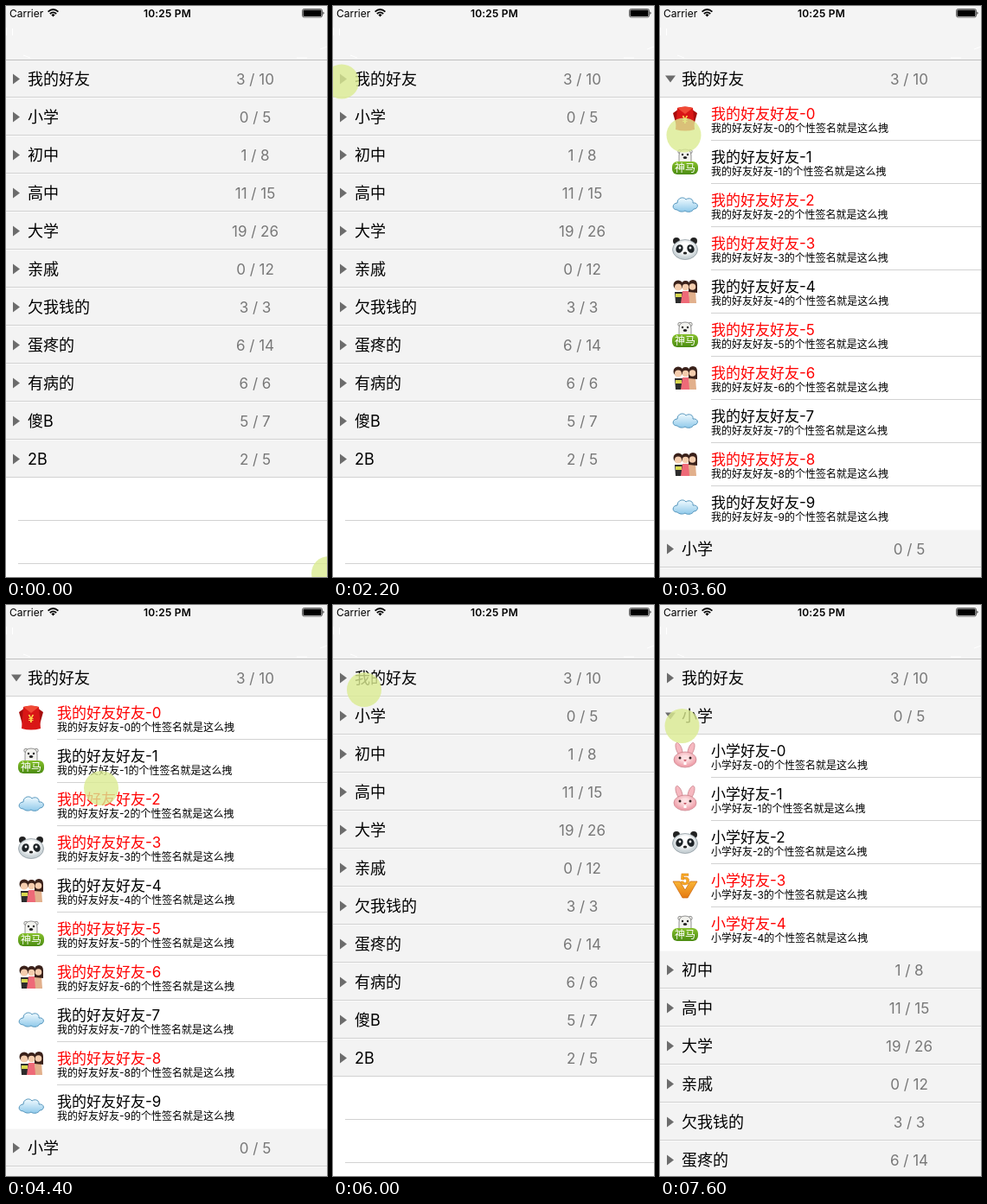
Animation of 371x661 px, one loop 8000 ms. Source, as an HTML page:

```html
<!DOCTYPE html>
<html lang="zh">
<head>
<meta charset="utf-8">
<title>Friend list</title>
<style>
html, body { margin: 0; width: 100%; height: 100%; overflow: hidden; background: #fff; }
svg { display: block; width: 371px; height: 661px; font-family: Inter, "Noto Sans CJK SC", "Noto Sans CJK", sans-serif; }
.group { font-size: 18px; }
.count { font-size: 17px; fill: #777; text-anchor: middle; }
.name { font-size: 17px; }
.vip { fill: #f00; }
.note { font-size: 12px; }
.line { fill: #d2d2d2; }
</style>
</head>
<body>
<svg viewBox="0 0 371 661">
  <defs>
    <linearGradient id="sky" x2="0" y2="1"><stop stop-color="#f2fbff"/><stop offset="1" stop-color="#8fc9ea"/></linearGradient>
    <linearGradient id="gold" x2="0" y2="1"><stop stop-color="#f9b536"/><stop offset="1" stop-color="#e57a12"/></linearGradient>
    <linearGradient id="grass" x2="0" y2="1"><stop stop-color="#86c02c"/><stop offset="1" stop-color="#4b8c12"/></linearGradient>
    <radialGradient id="face" cy=".4"><stop offset=".5" stop-color="#fff"/><stop offset="1" stop-color="#c9d2d6"/></radialGradient>
    <radialGradient id="pink" cy=".4"><stop offset=".3" stop-color="#fde0e2"/><stop offset="1" stop-color="#efa3ad"/></radialGradient>

    <g id="packet">
      <path d="M1 8L8 3 11 25 6 26ZM29 8L22 3 19 25 24 26Z" fill="#a80d0d"/>
      <path d="M6 2Q15-1 24 2L26 27Q15 30 4 27Z" fill="#d91616"/>
      <path d="M6 2L15 9 24 2Q15-1 6 2Z" fill="#f04a35"/>
      <text x="15" y="20" font-size="12" font-weight="700" text-anchor="middle" fill="#ffd34d">¥</text>
    </g>
    <g id="bear">
      <g fill="#f2f2ee" stroke="#777" stroke-width=".8">
        <circle cx="9" cy="2.5" r="2.2"/><circle cx="21" cy="2.5" r="2.2"/>
        <path d="M8 18V7Q8 0 15 0T22 7V18Z"/>
      </g>
      <g fill="#222"><circle cx="12" cy="6" r="1.2"/><circle cx="18" cy="6" r="1.2"/><ellipse cx="15" cy="9.5" rx="2.2" ry="1.6"/></g>
      <rect y="14" width="30" height="15" rx="6" fill="url(#grass)"/>
      <text x="15" y="26" font-size="12" text-anchor="middle" fill="#fff">神马</text>
    </g>
    <path id="cloud" d="M6 20C-1 20 0 12 6 12C6 6 13 4 16 8C20 5 25 8 24 12C31 11 31 19 25 19C23 23 17 23 15 21C12 23 8 22 6 20Z" fill="url(#sky)" stroke="#5596bd" stroke-width="1"/>
    <g id="panda">
      <circle cx="5" cy="6" r="4" fill="#222"/><circle cx="25" cy="6" r="4" fill="#222"/>
      <ellipse cx="15" cy="16" rx="14.5" ry="11.5" fill="url(#face)" stroke="#87939a" stroke-width=".7"/>
      <ellipse cx="8.5" cy="15" rx="4" ry="5" fill="#1c2226" transform="rotate(25 8.5 15)"/>
      <ellipse cx="21.5" cy="15" rx="4" ry="5" fill="#1c2226" transform="rotate(-25 21.5 15)"/>
      <circle cx="9" cy="14" r="1.4" fill="#fff"/><circle cx="21" cy="14" r="1.4" fill="#fff"/>
      <ellipse cx="15" cy="20" rx="2.2" ry="1.5" fill="#222"/>
    </g>
    <g id="kids">
      <path d="M4 28L3 15H12V28Z" fill="#2c2c2c"/><path d="M10 28L12 14H19L21 28Z" fill="#ee6a78"/><path d="M20 28L19 14H27L28 28Z" fill="#e2b08c"/>
      <g fill="#3a211a"><circle cx="7" cy="7" r="5.5"/><circle cx="15.5" cy="7" r="5"/><path d="M19 15V7Q19 1 24 1T29 7V16Z"/></g>
      <g fill="#f5cdae"><circle cx="7" cy="9.5" r="4"/><circle cx="15.5" cy="9.5" r="3.8"/><circle cx="23.5" cy="9" r="3.8"/></g>
      <path d="M4 17H11V21H4Z" fill="#d8d84e"/>
    </g>
    <g id="rabbit">
      <g fill="#f6b8c0" stroke="#c77f88" stroke-width=".7">
        <ellipse cx="8" cy="7" rx="3.2" ry="8" transform="rotate(-20 8 7)"/>
        <ellipse cx="22" cy="7" rx="3.2" ry="8" transform="rotate(20 22 7)"/>
        <ellipse cx="15" cy="19" rx="13" ry="9" fill="url(#pink)"/>
      </g>
      <circle cx="9" cy="17" r="1.5" fill="#322"/><circle cx="21" cy="17" r="1.5" fill="#322"/>
      <path d="M13 19H17L15 21Z" fill="#c44e5c"/><path d="M13.5 22H16.5V25H13.5Z" fill="#fff"/>
    </g>
    <g id="five">
      <path d="M1 10H9L15 20 21 10H29L18 29H12Z" fill="url(#gold)" stroke="#c8640c" stroke-width=".7"/>
      <text x="15" y="14" font-size="17" font-weight="800" text-anchor="middle" fill="#f7a823" stroke="#d77b12" stroke-width=".5">5</text>
    </g>
  </defs>

  <g id="table"></g>

  <rect width="371" height="62" fill="#f4f4f4"/>
  <rect y="62" width="371" height="1" fill="#bfbfbf"/>
  <path d="M.5 25V34M7.5 26V34M20 57L28 60M336 60H348M363 50L371 47" stroke="#fff" fill="none"/>
  <text x="4" y="13" font-size="12">Carrier</text>
  <g fill="none" stroke="#000" stroke-width="1.7">
    <path d="M48.6 6.7Q54.5 1.3 60.4 6.7M50.8 9Q54.5 5.7 58.2 9"/>
    <path d="M52.4 10.2Q54.5 8.4 56.6 10.2L54.5 12.5Z" fill="#000" stroke="none"/>
  </g>
  <text x="186.5" y="13" font-size="12" font-weight="600" letter-spacing=".2" text-anchor="middle">10:25 PM</text>
  <rect x="342.5" y="3.5" width="23" height="9.5" rx="2" fill="none" stroke="#000" stroke-width=".6"/>
  <rect x="343.5" y="4.5" width="21" height="7.5" rx="1"/>
  <path d="M366.5 6.5Q368.5 8.2 366.5 10Z"/>

  <circle id="touch" r="20" fill="#dbeb92" fill-opacity=".8"/>
</svg>
<script>
const TOP = 62, HEAD = 44, ROW = 50, LOOP = 8000, STEP = 200;
const groups = [
  ['我的好友', '3 / 10'], ['小学', '0 / 5'], ['初中', '1 / 8'], ['高中', '11 / 15'],
  ['大学', '19 / 26'], ['亲戚', '0 / 12'], ['欠我钱的', '3 / 3'], ['蛋疼的', '6 / 14'],
  ['有病的', '6 / 6'], ['傻B', '5 / 7'], ['2B', '2 / 5']
];
// Icons per group; * marks a red name
const friends = [
  '*packet bear *cloud *panda kids *bear *kids cloud *kids cloud',
  'rabbit rabbit panda *five *bear'
].map(s => s.split(' '));
// Touch path: time, x, y
const path = [
  [0, 373, 657], [800, 373, 657], [1000, 293, 600], [1200, 304, 589.5], [1400, 304, 589.5],
  [1800, 130, 210], [2000, 24, 19], [2200, 10, 87.5], [2600, 13, 86], [3200, 13, 86],
  [3400, 22, 122], [3600, 27.5, 149.5], [3800, 27, 132], [4000, 38, 148], [4400, 110, 212],
  [4600, 135, 224], [4800, 128, 206], [5000, 106, 186], [5200, 35, 64], [5600, 35, 64],
  [5800, 36, 74], [6000, 36, 98], [6200, 33, 122], [6600, 27, 148], [6800, 25.5, 140], [LOOP, 25.5, 140]
];

const $ = id => document.getElementById(id);

function friendRow(group, icon, i, last) {
  const name = groups[group][0] + (group ? '好友-' : '好友-') + i;
  const vip = icon[0] === '*';
  return `<g transform="translate(0 ${HEAD + i * ROW})">
    <use href="#${icon.replace('*', '')}" x="14" y="10"/>
    <text class="name ${vip ? 'vip' : ''}" x="59" y="25">${name}</text>
    <text class="note" x="59" y="40">${name}的个性签名就是这么拽</text>
    ${last ? '' : `<rect class="line" x="59" y="${ROW - 1}" width="312" height="1"/>`}</g>`;
}

function section([title, count], g) {
  const list = friends[g] || [];
  return `<g id="s${g}">
    <rect y="${HEAD}" width="371" height="${list.length * ROW}" fill="#fff"/>
    <g id="rows${g}">${list.map((icon, i) => friendRow(g, icon, i, i === list.length - 1)).join('')}</g>
    <rect width="371" height="${HEAD}" fill="#f3f3f3"/>
    <rect width="371" height="1" fill="#fafafa"/>
    <rect class="line" y="${HEAD - 1}" width="371" height="1"/>
    <path id="arrow${g}" fill="#6c6c6c"/>
    <text class="group" x="25" y="29">${title}</text>
    <text class="count" x="288" y="29">${count}</text></g>`;
}

$('table').innerHTML = groups.map(section).join('') +
  `<g id="s${groups.length}"><rect width="371" height="661" fill="#fff"/>` +
  [1, 2, 3].map(i => `<rect class="line" x="14" y="${i * ROW - 1}" width="357" height="1"/>`).join('') + '</g>';

function ease(t, start) {
  const p = Math.min(1, Math.max(0, (t - start + 100) / 400));
  return t < start ? 0 : p * p * (3 - 2 * p);
}

function touchAt(t) {
  const i = path.findIndex(k => k[0] > t);
  const [t0, x0, y0] = path[i - 1], [t1, x1, y1] = path[i];
  const p = (t - t0) / (t1 - t0);
  return [x0 + (x1 - x0) * p, y0 + (y1 - y0) * p];
}

function draw(t) {
  const open = [ease(t, 2800) - ease(t, 5600), ease(t, 7200)];
  const shown = [t >= 2800 && t < 5600, t >= 7200];
  let y = TOP;
  for (let g = 0; g <= groups.length; g++) {
    $('s' + g).setAttribute('transform', `translate(0 ${y})`);
    if (g === groups.length) break;
    $('arrow' + g).setAttribute('d', shown[g] ? 'M6 18.5H18L12 26.5Z' : 'M8 16.5V28.5L16 22.5Z');
    y += HEAD;
    if (friends[g]) {
      $('rows' + g).setAttribute('opacity', open[g]);
      y += friends[g].length * ROW * open[g];
    }
  }
  const [cx, cy] = touchAt(t);
  $('touch').setAttribute('cx', cx);
  $('touch').setAttribute('cy', cy);
}

const start = performance.now();
function tick() {
  const t = (performance.now() - start) % LOOP;
  draw(Math.floor(t / STEP) * STEP);
  requestAnimationFrame(tick);
}
tick();
</script>
</body>
</html>
```
